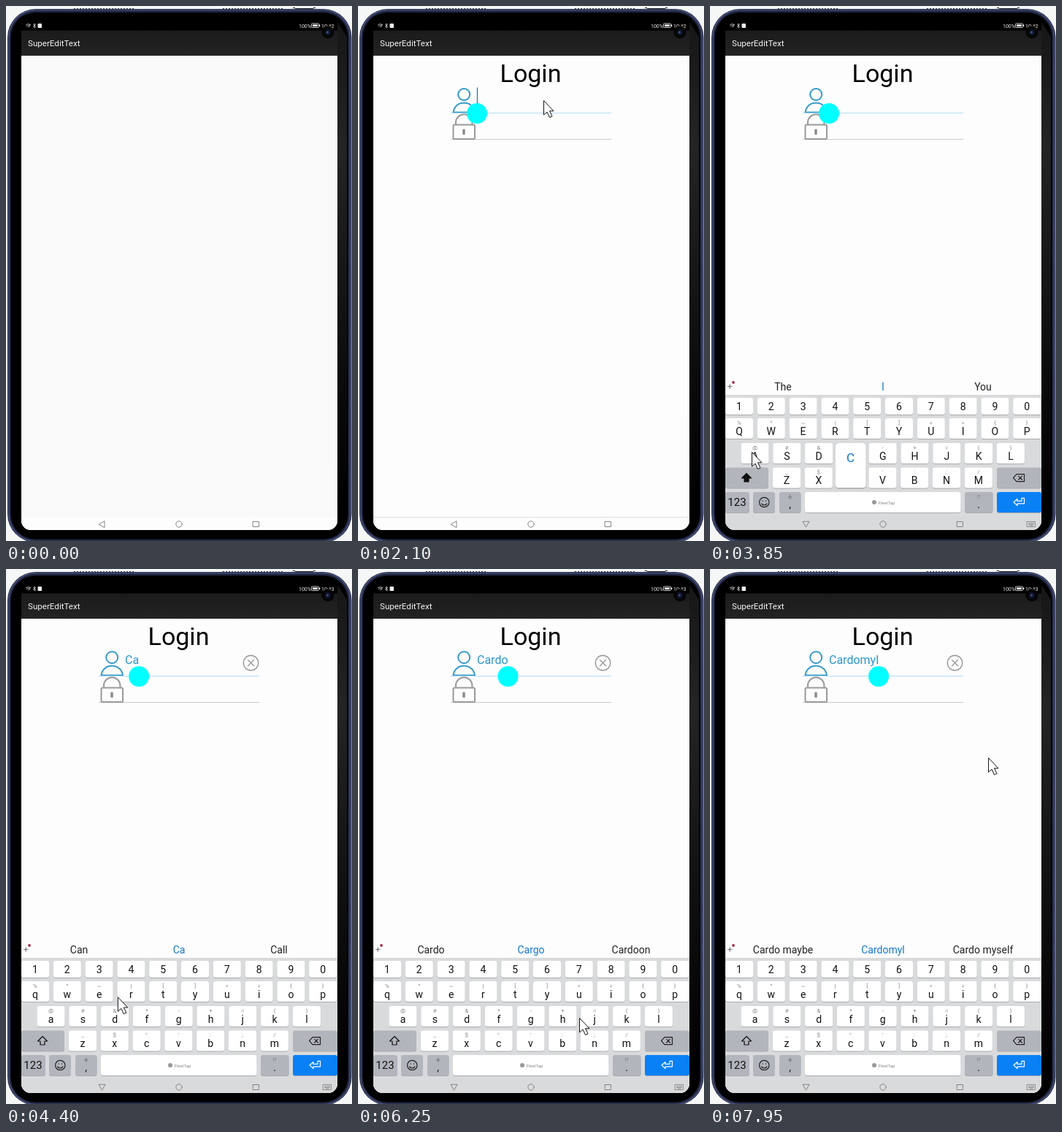
Write an HTML page that moves like this. It is 474 px wide and 732 px high and loops after 8000 ms.

```html
<!DOCTYPE html>
<html lang="en">
<head>
<meta charset="utf-8">
<title>SuperEditText</title>
<style>
  html, body { margin: 0; width: 100%; height: 100%; overflow: hidden; background: #f5f7f6; }
  svg { display: block; width: 474px; height: 732px; font-family: Roboto, "Open Sans", sans-serif; }
  .mid { text-anchor: middle; }
  .line { fill: none; stroke-linecap: round; stroke-linejoin: round; }
</style>
</head>
<body>
<svg viewBox="0 0 474 732">
  <defs>
    <linearGradient id="side" x1="0" y1="0" x2="0" y2="1">
      <stop offset="0" stop-color="#161616"/>
      <stop offset=".25" stop-color="#242424"/>
      <stop offset=".7" stop-color="#0c0c0c"/>
      <stop offset="1" stop-color="#000"/>
    </linearGradient>
    <linearGradient id="bar" x1="0" y1="0" x2="0" y2="1">
      <stop offset="0" stop-color="#1b1b1b"/>
      <stop offset="1" stop-color="#232323"/>
    </linearGradient>
    <clipPath id="screen"><path d="M21 23H454V704a13 13 0 0 1-13 13H34a13 13 0 0 1-13-13Z"/></clipPath>
  </defs>

  <!-- tablet body -->
  <path d="M93 3.5H177M297 3.5H381" stroke="#444" stroke-dasharray="2 2"/>
  <path d="M393 2.5h3M421 2.5h3M396 3.5h25" stroke="#222"/>
  <rect x="2" y="4" width="471.5" height="730" rx="39" fill="#20263f"/>
  <rect x="4" y="5.5" width="467.5" height="727" rx="37" fill="none" stroke="#465079" stroke-width="1.6"/>
  <rect x="6.5" y="9" width="462" height="720.5" rx="34" fill="#000"/>
  <path d="M454 22L467 42V640L454 700Z" fill="url(#side)"/>

  <g clip-path="url(#screen)">
    <rect id="page" x="21" y="23" width="433" height="694"/>
    <rect x="21" y="23" width="433" height="11" fill="#000"/>
    <rect x="21" y="33.5" width="433" height="34.5" fill="url(#bar)"/>
    <text x="30" y="55" font-size="11.6" fill="#f4f4f4">SuperEditText</text>

    <g fill="#eee" font-size="7">
      <path class="line" stroke="#ddd" stroke-width=".8" d="M27.5 25.5q3-2 6 0M28.5 27.2q2-1.4 4 0M30.5 29l3-4M37.5 25.5l3 3-1.5 1.5v-6l1.5 1.5-3 3"/>
      <rect x="43.5" y="24" width="5.5" height="6" rx="1"/>
      <text x="401" y="29.5">100%</text>
      <rect x="418.5" y="24" width="10" height="5.5" rx="1" fill="none" stroke="#ddd" stroke-width=".9"/>
      <rect x="420" y="25.4" width="7" height="2.7"/>
      <rect x="429" y="25.5" width="1.2" height="2.5"/>
      <text id="clock" x="432" y="29.5"></text>
    </g>

    <g id="form">
      <text class="mid" x="236.5" y="104" font-size="34" fill="#000">Login</text>
      <path id="user" class="line" stroke-width="2" d="M153.2 121a8 8 0 1 1-16 0a8 8 0 1 1 16 0M130.5 145.5c1-8 7-13 14.7-13s13.800 5 14.800 13Z"/>
      <path id="rule" d="M127 146.500H347"/>
      <path d="M127 182.500H347" stroke="#c9c9c9"/>
      <g class="line" stroke="#999" stroke-width="2">
        <rect x="130.500" y="162.500" width="29.500" height="19.500" rx="2"/>
        <path d="M134 162v-2.500a11.200 11.200 0 0 1 22.400 0v2.500"/>
      </g>
      <rect x="143.300" y="168.500" width="3.400" height="7.500" rx="1" fill="#888"/>
      <text id="entry" x="163" y="129.500" font-size="16" fill="#2a96d2"></text>
      <path id="caret" d="M163.500 111.500V135" stroke="#1f7fa6" stroke-width="1.300"/>
      <path id="clear" class="line" stroke="#999" stroke-width="1.400" d="M345.700 128.500a10.200 10.200 0 1 1-20.400 0a10.200 10.200 0 1 1 20.400 0M331.500 124.500l8 8M339.500 124.500l-8 8"/>
      <circle id="handle" cy="147" r="14" fill="#0ff"/>
    </g>

    <g id="board"></g>

    <rect id="nav" x="21" y="699.500" width="433" height="18"/>
    <path id="navLine" d="M21 699.500H454" stroke="#ddd"/>
    <g class="line" stroke="#858585">
      <path id="back" d="M127.500 709l7.500-4.300v8.600Z"/>
      <circle cx="237" cy="709" r="4.200"/>
      <rect x="338.500" y="705.500" width="8" height="7"/>
      <path id="hide" stroke-width=".9" d="M434.500 705.500h11v7h-11ZM436.500 707.700h7M436.500 709.500h7M438 711h4"/>
    </g>
  </g>

  <circle cx="441" cy="36" r="8.500" fill="#050505"/>
  <circle cx="441" cy="36" r="4.500" fill="#0d1124"/>
  <circle cx="440.500" cy="36" r="1.700" fill="#3d4c86"/>

  <path id="mouse" d="M.5 .5V20l4.500-4 3.500 7.500 3.500-1.600-3.500-7.200h5.500Z" fill="#fff" stroke="#111"/>
</svg>

<script>
const $ = id => document.getElementById(id);
const LOOP = 8000, STEP = 50, PITCH = 43.8;
const BLUE = '#1478c8';

// time, text, three suggestions
const typed = [
  [0, '', 'The', 'I', 'You'],
  [3900, 'C', 'Can', 'C', 'Come'],
  [4150, 'Ca', 'Can', 'Ca', 'Call'],
  [4850, 'Car', 'Far', 'Car', 'Cat'],
  [5350, 'Card', 'Cars', 'Card', 'Care'],
  [6050, 'Cardo', 'Cardo', 'Cargo', 'Cardoon'],
  [6500, 'Cardom', 'Cardom', 'Random', 'Cardamom'],
  [7000, 'Cardomy', 'Cardo my', 'Cardomy', 'Card my'],
  [7500, 'Cardomyl', 'Cardo maybe', 'Cardomyl', 'Cardo myself']
];

// key, pressed from, pressed until
const presses = [
  ['C', 3700, 3900], ['A', 4000, 4150], ['R', 4700, 4850], ['D', 5200, 5350],
  ['O', 5900, 6050], ['M', 6400, 6500], ['Y', 6850, 7000], ['L', 7400, 7500]
];

// time, x, y of the pointer tip
const route = [
  [950, 456, 560], [1400, 254, 129], [2500, 254, 129], [2950, 163, 618],
  [3300, 182, 645], [3350, 187, 645], [3700, 187, 645], [3850, 57, 610],
  [4150, 57, 612], [4450, 172, 580], [4850, 172, 580], [5050, 112, 611],
  [5150, 133, 612], [5700, 133, 612], [5900, 396, 582], [6200, 396, 582],
  [6250, 303, 614], [6350, 364, 646], [6500, 364, 646], [6750, 262, 582],
  [7300, 262, 582], [7400, 403, 612], [7500, 403, 612], [7650, 179, 169],
  [7900, 179, 169], [7950, 381, 258]
];

const rows = [
  { keys: '1234567890', x: 40, y: 536, h: 23 },
  { keys: 'QWERTYUIOP', hints: '%^~|[]<>{}', x: 40, y: 564, h: 28 },
  { keys: 'ASDFGHJKL', hints: '@#&*-+=()', x: 61.5, y: 598, h: 28 },
  { keys: 'ZXCVBNM', hints: '_$"\':;/', x: 105, y: 631.5, h: 28 }
];

const esc = s => s.replace('&', '&amp;').replace('<', '&lt;');
const label = (x, y, size, s, fill = '#111', extra = '') =>
  `<text class="mid" x="${x}" y="${y}" font-size="${size}" fill="${fill}" ${extra}>${esc(s)}</text>`;
const key = (x, y, w, h, fill = '#fff') =>
  `<rect x="${x}" y="${y + 1}" width="${w}" height="${h}" rx="3" fill="#aaacb0"/>
   <rect x="${x}" y="${y}" width="${w}" height="${h}" rx="3" fill="${fill}"/>`;
const icon = (d, stroke = '#222', fill = 'none') =>
  `<path class="line" d="${d}" stroke="${stroke}" stroke-width="1.2" style="fill:${fill}"/>`;

const spots = {};

function drawBoard() {
  let s = '<rect x="21" y="510" width="433" height="23" fill="#fdfdfd"/>' +
    '<rect x="21" y="532" width="433" height="190" fill="#d9dadc"/>' +
    icon('M24.500 520.500h5.500M27.200 517.800v5.500', '#777') +
    '<circle cx="32" cy="515" r="1.900" fill="#a8324a"/>';
  [100, 237, 374].forEach((x, i) => {
    s += label(x, 525.5, 14, '', i === 1 ? BLUE : '#222', `id="word${i}"`);
  });
  for (const { keys, hints, x, y, h } of rows) {
    [...keys].forEach((k, i) => {
      const cx = x + i * PITCH;
      spots[k] = [cx, y];
      s += key(cx - 19, y, 38, h);
      if (hints) {
        s += label(cx, y + 8.5, 8, hints[i], '#888');
        s += label(cx, y + 22.8, 14, k, '#111', `data-key="${k}"`);
      } else s += label(cx, y + 17, 14, k);
    });
  }
  const grey = '#b2b5bc';
  s += key(21, 631.5, 59, 28, grey) + key(393, 631.5, 61, 28, grey) +
    key(21, 665, 33, 28, grey) + key(59, 665, 30, 28, grey) +
    key(95, 665, 29.5, 28, grey) + key(130, 665, 213.5, 28) +
    key(349, 665, 38.5, 28, grey) + key(393, 665, 61, 28, '#0a80f5');
  s += '<path id="shift" class="line" stroke="#111" stroke-width="1.200" d="M50 639.500l6.500 6.500h-3.500v5h-6v-5h-3.500Z"/>';
  s += icon('M415.500 645.700l4.500-5h10.500v10h-10.500ZM422.800 643.400l4.600 4.600M427.400 643.400l-4.600 4.600');
  s += label(37, 684, 15, '123') + label(109.7, 687, 14, ',') + label(368, 687, 14, '.') +
    label(368, 674, 7, '!?', '#777');
  s += icon('M81 679a6.700 6.700 0 1 1-13.400 0a6.700 6.700 0 1 1 13.400 0M70.800 681q3.500 4 7 0M72 676.800v.4M76.600 676.800v.4');
  s += icon('M109.700 669v2.500M107.700 671.500q2 3 4 0M109.700 673v1.500', '#777');
  s += '<circle cx="225" cy="679" r="3" fill="#999"/><text x="230.500" y="681.500" font-size="6" fill="#888">FleetTap</text>';
  s += icon('M416 679l5-4.500v2.800h6v-4h3.500v7.500h-9.500v2.800Z', '#fff');
  s += `<g id="pop"><rect x="-21.500" y="-31.500" width="43" height="60.500" rx="4" fill="#999" opacity=".5"/>
    <rect x="-21" y="-32.500" width="42" height="60" rx="4" fill="#fff"/>
    ${label(0, -7.5, 17, '', BLUE, 'id="popText"')}</g>`;
  $('board').innerHTML = s;
}

const show = (id, on) => $(id).style.display = on ? '' : 'none';
const paint = (id, prop, value) => $(id).setAttribute(prop, value);

function pointer(t) {
  const n = route.findIndex(p => p[0] > t);
  if (n < 0) return route[route.length - 1].slice(1);
  const a = route[Math.max(0, n - 1)], b = route[n];
  const u = Math.max(0, (t - a[0]) / (b[0] - a[0] || 1));
  return [a[1] + (b[1] - a[1]) * u, a[2] + (b[2] - a[2]) * u];
}

function render(t) {
  const loaded = t >= 450, focused = t >= 2100, open = t >= 2500;
  const lower = t >= 3900;
  const [, text, ...words] = typed.filter(r => r[0] <= t).pop();

  paint('page', 'fill', loaded ? '#fdfdfd' : '#f9f9f9');
  $('clock').textContent = t < 4300 ? '10:42' : '10:43';
  show('form', loaded);
  paint('user', 'stroke', focused ? '#3299cc' : '#999');
  paint('rule', 'stroke', focused ? '#b4dcf4' : '#c9c9c9');
  $('entry').textContent = text;
  show('caret', focused && t < 2600);
  show('clear', text);
  show('handle', focused);
  paint('handle', 'cx', 163 + (text ? $('entry').getComputedTextLength() : 0));

  show('board', open);
  const slide = Math.min(1, (t - 2450) / 250);
  paint('board', 'transform', `translate(0 ${207 * (1 - slide) ** 2})`);
  words.forEach((w, i) => $('word' + i).textContent = w);
  document.querySelectorAll('[data-key]').forEach(e => {
    const k = e.dataset.key;
    e.textContent = lower ? k.toLowerCase() : k;
  });
  paint('shift', 'style', `fill:${lower ? 'none' : '#111'}`);

  const hit = presses.find(p => t >= p[1] && t < p[2]);
  show('pop', hit);
  if (hit) {
    paint('pop', 'transform', `translate(${spots[hit[0]]})`);
    $('popText').textContent = lower ? hit[0].toLowerCase() : hit[0];
  }

  paint('nav', 'fill', open ? '#d9dadc' : '#fdfdfd');
  show('navLine', loaded && !open);
  show('hide', t >= 2150);
  paint('back', 'transform', t >= 2300 ? 'rotate(-90 131.300 709)' : '');

  show('mouse', t >= 950);
  paint('mouse', 'transform', `translate(${pointer(t)})`);
}

drawBoard();
const start = performance.now();
function tick(now) {
  const t = Math.max(0, now - start) % LOOP;
  render(Math.floor(t / STEP) * STEP);
  requestAnimationFrame(tick);
}
render(0);
requestAnimationFrame(tick);
</script>
</body>
</html>
```
